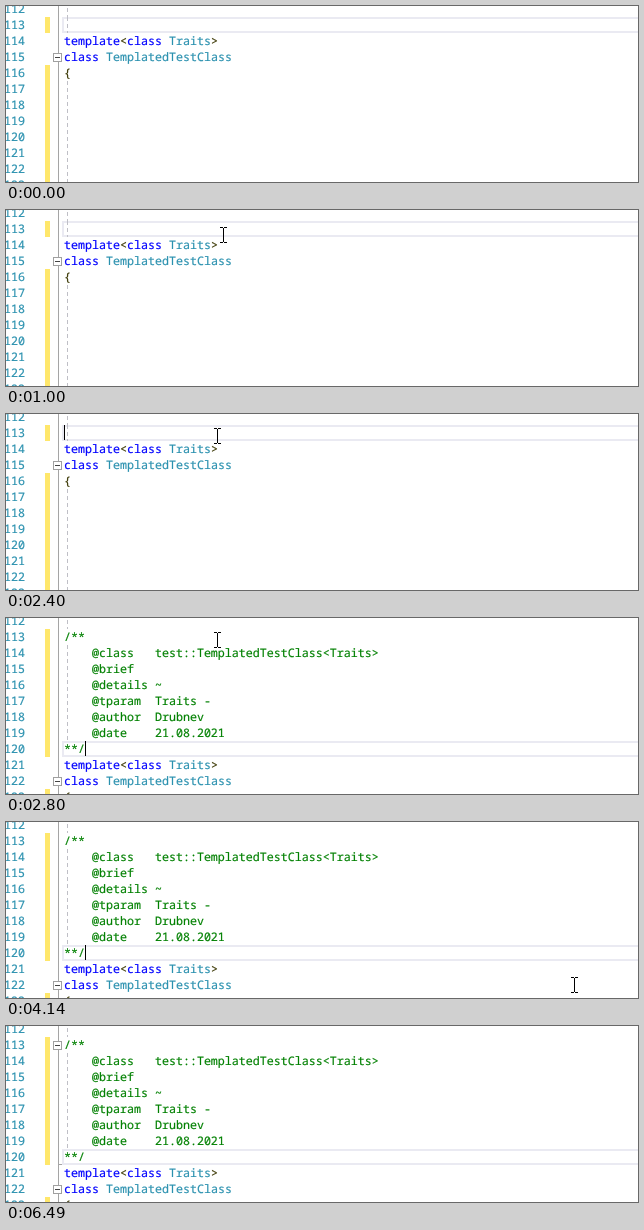
Write an HTML page that moves like this. It is 632x176 px and loops after 7030 ms.

```html
<!DOCTYPE html>
<html lang="en">
<head>
<meta charset="utf-8">
<title>Comment generator</title>
<style>
  html, body { margin: 0; width: 100%; height: 100%; overflow: hidden; background: #fff; }
  svg { display: block; width: 632px; height: 176px; }
  text {
    font: 11.667px "Noto Sans Mono", "DejaVu Sans Mono", monospace;
    font-variant-ligatures: none;
    text-rendering: geometricPrecision;
    white-space: pre;
    fill: currentColor;
    stroke: currentColor;
    stroke-width: .2px;
  }
  .num, .type { color: #2b91af; }
  .key { color: #0000ff; }
  .doc { color: #008000; }
  .punct { color: #3d3a06; }
  .bar { fill: #ffe76b; }
  .rule { fill: #a5a5a5; }
  .fold { fill: #fff; stroke: #a0a0a0; }
  .minus { fill: #444; }
  .guide { stroke: #bfbfc6; stroke-dasharray: 4 3; }
  .current { fill: none; stroke: #eaeaf2; stroke-width: 2; }
</style>
</head>
<body>
<svg id="stage" viewBox="0 0 632 176" shape-rendering="crispEdges"></svg>
<script>
const LOOP = 7030, TICK = 66, BLINK = 526;
const CELL = 7, LEFT = 58, ROW = 16;
const INSERT = 2800, CLICK = 1340, FOLD = 5810;
const stage = document.getElementById('stage');
const rowTop = n => 11 + (n - 113) * ROW;

function add(parent, tag, attrs, content) {
  const el = document.createElementNS('http://www.w3.org/2000/svg', tag);
  for (const k in attrs) el.setAttribute(k, attrs[k]);
  if (content) el.textContent = content;
  return parent.appendChild(el);
}
const group = () => add(stage, 'g', {});
const rect = (g, cls, x, y, width, height) =>
  add(g, 'rect', { class: cls, x, y, width, height });

// tokens: [class, text], laid out one after another
function line(g, n, ...tokens) {
  let x = LEFT;
  for (const [cls, str] of tokens) {
    add(g, 'text', { class: cls, x, y: rowTop(n) + 12 }, str);
    x += str.length * CELL;
  }
}
function bars(g, from, to) {
  rect(g, 'bar', 39, rowTop(from), 5, (to - from + 1) * ROW);
}
function guide(g, from, to) {
  add(g, 'line', { class: 'guide', x1: 61.5, x2: 61.5, y1: rowTop(from), y2: rowTop(to + 1) });
}
function current(g, n) {
  rect(g, 'current', LEFT - 1, rowTop(n) + 1, 600, 14);
}
function fold(g, n) {
  const y = rowTop(n) + 4;
  rect(g, 'fold', 47.5, y + .5, 8, 8);
  rect(g, 'minus', 49, y + 4, 5, 1);
}
function caret(col, n) {
  return rect(stage, 'caret', LEFT + col * CELL, rowTop(n), 1, 15);
}
function declaration(g, n) {
  line(g, n, ['key', 'template'], ['punct', '<'], ['key', 'class '],
    ['type', 'Traits'], ['punct', '>']);
  line(g, n + 1, ['key', 'class '], ['type', 'TemplatedTestClass']);
  line(g, n + 2, ['punct', '{']);
  fold(g, n + 1);
}

// gutter
const base = group();
for (let n = 112; n <= 123; n++)
  add(base, 'text', { class: 'num', x: -2, y: rowTop(n) + 12 }, String(n));
rect(base, 'rule', 52, 0, 1, 176);
guide(base, 112, 112);

// before the comment
const before = group();
bars(before, 113, 113);
bars(before, 116, 123);
current(before, 113);
guide(before, 113, 113);
guide(before, 117, 123);
declaration(before, 114);

// with the comment
const after = group();
bars(after, 113, 120);
bars(after, 123, 123);
current(after, 120);
guide(after, 114, 119);
[
  '/**',
  '    @class   test::TemplatedTestClass<Traits>',
  '    @brief',
  '    @details ~',
  '    @tparam  Traits -',
  '    @author  Drubnev',
  '    @date    21.08.2021',
  '**/'
].forEach((str, i) => line(after, 113 + i, ['doc', str]));
declaration(after, 121);

const outline = group();
fold(outline, 113);
rect(outline, 'rule', 52, rowTop(121) - 1, 4, 1);

const caretTop = caret(0, 113);
const caretEnd = caret(3, 120);

// text pointer, centred on its own zero
const pointer = group();
add(pointer, 'path', {
  d: 'M-3 -8h3v1h1v-1h3v1h-3v14h3v1h-3v-1h-1v1h-3v-1h3v-14h-3z'
});

// steps: [ms, value]; each value holds until the next step
function hold(el, prop, steps) {
  const frames = steps.map(([ms, v]) =>
    ({ offset: ms / LOOP, [prop]: v, easing: 'steps(1, end)' }));
  frames.push({ offset: 1, [prop]: steps[steps.length - 1][1] });
  el.animate(frames, { duration: LOOP, iterations: Infinity });
}
const show = (el, from, to = LOOP) =>
  hold(el, 'opacity', [[0, from ? 0 : 1], [from, 1], [to, 0]]
    .filter(([ms], i) => ms < LOOP && (i || from)));

function blink(el, from, to) {
  const steps = [[0, 0]];
  for (let t = from, on = 1; t < to; t += BLINK, on = 1 - on) steps.push([t, on]);
  if (to < LOOP) steps.push([to, 0]);
  hold(el, 'opacity', steps);
}

show(before, 0, INSERT);
show(after, INSERT);
show(outline, FOLD);
blink(caretTop, CLICK, INSERT);
blink(caretEnd, INSERT, LOOP);

const linear = p => p;
const easeOut = a => p => 1 - (1 - p) ** a;
const easeInOut = a => p => p < .5 ? (2 * p) ** a / 2 : 1 - (2 - 2 * p) ** a / 2;
const place = (x, y) => `translate(${Math.round(x)}px, ${Math.round(y)}px)`;

// samples a move once per tick, each axis with its own easing
function glide(start, count, [x0, y0], [x1, y1], easeX, easeY) {
  return Array.from({ length: count }, (_, k) => {
    const p = k / (count - 1);
    return [start + k * TICK, place(x0 + (x1 - x0) * easeX(p), y0 + (y1 - y0) * easeY(p))];
  });
}

const near = [217, 25], rest = [211, 22];
hold(pointer, 'transform', [
  [0, place(0, -40)],
  ...glide(450, 8, [564, 172], near, easeOut(2.6), easeOut(3.3)),
  ...glide(1270, 3, near, rest, linear, linear),
  ...glide(3740, 10, rest, [593, 187], easeInOut(5), easeInOut(3))
]);
</script>
</body>
</html>
```
